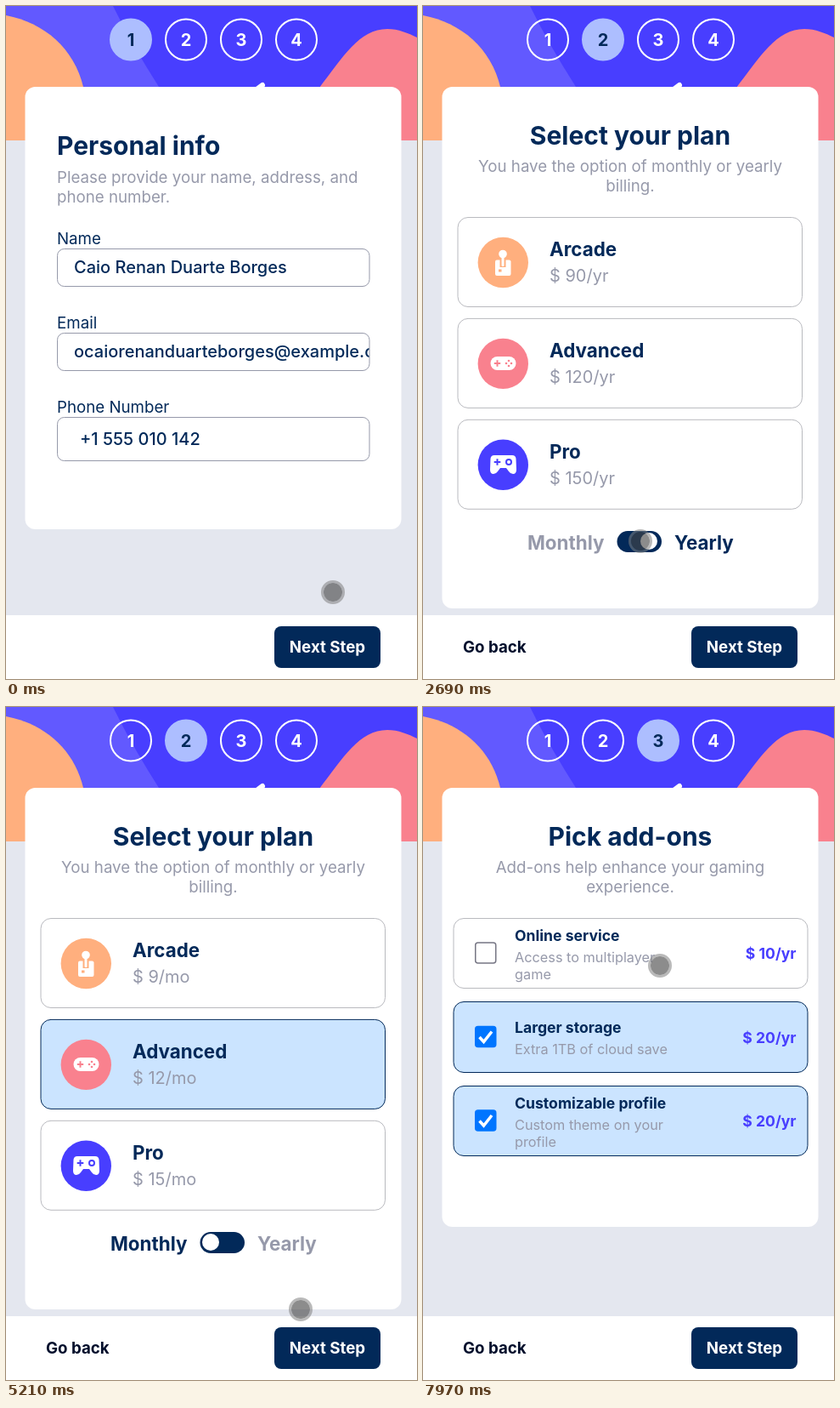
An HTML page for the animation above (8000 ms loop, 484 by 791 pixels).

```html
<!DOCTYPE html>
<html lang="en">
<head>
<meta charset="utf-8">
<title>Multi-step form</title>
<style>
  html, body { margin: 0; width: 100%; height: 100%; overflow: hidden; background: #e4e7ef; }
  svg { display: block; width: 100%; height: 100%; font-family: Inter, sans-serif; font-optical-sizing: none; }
  text { white-space: pre; }
</style>
</head>
<body>
<svg id="stage" viewBox="0 0 484 791" xmlns="http://www.w3.org/2000/svg"></svg>
<script>
const NAVY = '#022959', GRAY = '#9699aa', PURPLE = '#483eff', ORANGE = '#ffaf7e', PINK = '#f9818e';
const LOOP = 8000;

// ---- Drawing helpers ----
const text = (x, y, size, str, { fill = NAVY, weight = 400, anchor = 'start', id = '' } = {}) =>
  `<text x="${x}" y="${y}" font-size="${size}" fill="${fill}" font-weight="${weight}" text-anchor="${anchor}"${id && ` id="${id}"`}>${str}</text>`;

const box = (x, y, w, h, r, fill, extra = '') =>
  `<rect x="${x}" y="${y}" width="${w}" height="${h}" rx="${r}" fill="${fill}" ${extra}/>`;

const circle = (x, y, r, fill, extra = '') => `<circle cx="${x}" cy="${y}" r="${r}" fill="${fill}" ${extra}/>`;

const plus = (x, y, r, color) =>
  `<path d="M${x - r} ${y}h${2 * r}M${x} ${y - r}v${2 * r}" stroke="${color}" stroke-width="2"/>`;

const heading = (title, ...lines) =>
  text(244, 163, 30, title, { weight: 700, anchor: 'middle' }) +
  lines.map((line, i) => text(244, 195 + 23 * i, 18.72, line, { fill: GRAY, anchor: 'middle' })).join('');

const panel = bottom => box(22.5, 95, 443, bottom - 95, 12, '#fff');

// ---- Scenery ----
const scenery = `
  ${box(0, 0, 484, 791, 0, '#e4e7ef')}
  ${box(0, 0, 484, 158, 0, PURPLE)}
  <path d="M0 0H126Q148 45 180 95L205 158H0Z" fill="#6259ff"/>
  <path d="M0 11C46 20 80 50 91 95Q96 120 94 158H0Z" fill="${ORANGE}"/>
  <path d="M369 96C397 60 416 27 449 27C462 27 474 32 484 37V158H369Z" fill="${PINK}"/>
  <path d="M294 99L302 93" stroke="#fff" stroke-width="6" stroke-linecap="round"/>`;

const steps = [1, 2, 3, 4].map(n => {
  const x = 82 + 65 * n;
  return circle(x, 39.5, 24, 'none', `id="step${n}" stroke="#fff" stroke-width="2"`) +
    text(x, 47, 20, n, { weight: 700, anchor: 'middle', id: `num${n}` });
}).join('');

// ---- Page 1: personal info ----
const field = (label, value, y, height, x) =>
  text(60, y - 5, 18.72, label) +
  box(60.5, y + .5, 367.5, height, 8, '#fff', `stroke="${GRAY}"`) +
  `<g clip-path="url(#fieldClip)">${text(x, y + height / 2 + 7, 20, value, { weight: 500 })}</g>`;

const infoPage = panel(615) +
  text(60, 175, 30, 'Personal info', { weight: 700 }) +
  text(60, 208, 18.72, 'Please provide your name, address, and', { fill: GRAY }) +
  text(60, 231, 18.72, 'phone number.', { fill: GRAY }) +
  field('Name', 'Caio Renan Duarte Borges', 285, 44, 80) +
  field('Email', 'ocaiorenanduarteborges@example.com', 384, 44, 80) +
  field('Phone Number', '+1 555 010 142', 483, 51, 87);

// ---- Page 2: plans ----
const arcadeIcon = circle(94, 291.5, 4.8, '#fff') +
  box(85, 298.5, 18.5, 18.5, 2, '#fff') + box(90.5, 298, 7, 9, 0, ORANGE) +
  box(92.5, 294, 3, 12, 1, '#fff') + box(89, 309.5, 3.5, 3, 0, ORANGE);

const advancedIcon = box(79.5, 412, 30, 16, 8, '#fff') + plus(87.5, 420, 3.7, PINK) +
  [[98, 420], [104, 420], [101, 417], [101, 423]].map(([x, y]) => circle(x, y, 1.3, PINK)).join('');

const proIcon =
  `<path d="M84 528H105Q109 528 109.500 532L110 545Q110 550 106 550Q103 550 101 547L98 543H91L88 547Q86 550 83 550Q79 550 79 545L79.500 532Q80 528 84 528Z" fill="#fff"/>` +
  plus(87.5, 536, 3.8, PURPLE) + circle(101, 536, 3, 'none', `stroke="${PURPLE}" stroke-width="2"`);

const plans = [
  { name: 'Arcade', price: 9, color: ORANGE, icon: arcadeIcon },
  { name: 'Advanced', price: 12, color: PINK, icon: advancedIcon },
  { name: 'Pro', price: 15, color: PURPLE, icon: proIcon },
];

const planPage = panel(708) +
  heading('Select your plan', 'You have the option of monthly or yearly', 'billing.') +
  plans.map(({ name, color, icon }, i) => {
    const y = 248.5 + 118.9 * i;
    return box(41, y, 405.5, 105, 12, '#fff', `id="plan${i}"`) +
      circle(94.3, y + 53, 29.7, color) + icon +
      text(149, y + 45.5, 22.4, name, { weight: 700 }) +
      text(149, y + 75.5, 20, '', { fill: GRAY, id: `price${i}` });
  }).join('') +
  text(123, 639, 22.4, 'Monthly', { weight: 700, id: 'monthly' }) +
  text(296, 639, 22.4, 'Yearly', { weight: 700, id: 'yearly' }) +
  box(228.5, 617, 52.5, 25, 12.5, NAVY) + circle(241, 629, 10, '#fff', 'id="knob"');

// ---- Page 3: add-ons ----
const addons = [
  { name: 'Online service', note: ['Access to multiplayer', 'game'], price: 10, y: 248.5, h: 82 },
  { name: 'Larger storage', note: ['Extra 1TB of cloud save'], price: 20, y: 346.5, h: 83 },
  { name: 'Customizable profile', note: ['Custom theme on your', 'profile'], price: 20, y: 445.5, h: 82 },
];

const addonPage = panel(611) +
  heading('Pick add-ons', 'Add-ons help enhance your gaming', 'experience.') +
  addons.map(({ name, note, price, y, h }, i) => {
    const mid = y + h / 2;
    const top = mid - 5 - 10 * (note.length - 1);
    return box(36, y, 417, h, 12, '#fff', `id="addon${i}"`) +
      box(61.75, mid - 12.5, 24, 24, 3, '#fff', `id="check${i}" stroke-width="1.5"`) +
      `<path id="tick${i}" d="M66.500 ${mid}l5 5.500l9.500-12" fill="none" stroke="#fff" stroke-width="3.500"/>` +
      text(108, top, 17.6, name, { weight: 700 }) +
      note.map((line, n) => text(108, top + 25 + 20 * n, 16.3, line, { fill: GRAY })).join('') +
      text(439.5, mid + 6.5, 17.6, `$ ${price}/yr`, { fill: PURPLE, weight: 700, anchor: 'end' });
  }).join('');

const footer = box(0, 716, 484, 75, 0, '#fff') +
  text(47, 760, 18.72, 'Go back', { fill: '#020f2c', weight: 700, id: 'back' }) +
  box(316, 729, 125, 49, 8, NAVY, 'id="next"') +
  text(378.5, 760, 18.72, 'Next Step', { fill: '#fff', weight: 700, anchor: 'middle' });

const pointer = `<g id="pointer">
  ${circle(0, 0, 11, 'rgba(70,70,70,.62)')}
  ${circle(0, 0, 12.5, 'none', 'stroke="rgba(128,128,128,.55)" stroke-width="3"')}</g>`;

document.getElementById('stage').innerHTML = `
  <clipPath id="fieldClip"><rect x="61" y="285" width="366.500" height="250"/></clipPath>
  ${scenery}${steps}
  <g id="page1">${infoPage}</g><g id="page2">${planPage}</g><g id="page3">${addonPage}</g>
  ${footer}${pointer}`;

// ---- Timeline: [start ms, value] ----
const pageAt = [[0, 1], [700, 2], [6640, 3]];
const hoverAt = [[0, false], [700, true], [1790, false], [6640, true], [7180, false]];
const yearlyAt = [[0, 0], [1790, 1], [2800, 0], [5680, 1]];
const planAt = [[0, -1], [3520, 2], [3920, 1], [4200, 0], [4540, 1]];
const addonTaps = [Infinity, 7640, 7180];

// Pointer stops: [ms, x, y]
const route = [
  [130, 385, 689], [530, 372, 752], [950, 372, 752], [1380, 252, 613], [1530, 230, 626],
  [1660, 252, 630], [1760, 256, 629], [3020, 256, 629], [3440, 259, 545], [3580, 259, 545],
  [3850, 265, 417], [3950, 265, 410], [4170, 265, 305], [4300, 265, 305], [4500, 262, 412],
  [4640, 262, 412], [5140, 332, 677], [5210, 347, 708], [5260, 346, 712], [5600, 256, 630],
  [5980, 256, 630], [6500, 357, 754], [6800, 357, 754], [7120, 295, 490], [7260, 295, 490],
  [7550, 286, 380], [7700, 284, 378], [7970, 279, 304],
];

const stepAt = (list, t) => list.findLast(([start]) => start <= t);
const valueAt = (list, t) => stepAt(list, t)[1];
const smooth = p => { p = Math.min(1, Math.max(0, p)); return p * p * (3 - 2 * p); };

function pointerAt(t) {
  const i = route.findIndex(([end]) => end > t);
  if (i === 0) return route[0].slice(1);
  if (i < 0) return route.at(-1).slice(1);
  const [t0, x0, y0] = route[i - 1], [t1, x1, y1] = route[i];
  const p = smooth((t - t0) / (t1 - t0));
  return [x0 + (x1 - x0) * p, y0 + (y1 - y0) * p];
}

const el = id => document.getElementById(id);
const set = (id, attrs) => Object.entries(attrs).forEach(([k, v]) => el(id).setAttribute(k, v));
const show = (id, on) => set(id, { display: on ? 'inline' : 'none' });
const cardLook = on => on ? { fill: '#cbe4ff', stroke: NAVY } : { fill: '#fff', stroke: '#b9babf' };

function render(t) {
  const page = valueAt(pageAt, t);
  for (let n = 1; n <= 4; n++) {
    const active = n === page;
    set(`step${n}`, { fill: active ? '#adbeff' : 'none', stroke: active ? '#adbeff' : '#fff' });
    set(`num${n}`, { fill: active ? NAVY : '#fff' });
    if (n < 4) show(`page${n}`, active);
  }
  show('back', page > 1);
  set('next', { fill: valueAt(hoverAt, t) ? '#1c3f67' : NAVY });

  const [toggled, yearly] = stepAt(yearlyAt, t);
  const slide = toggled ? smooth((t - toggled) / 250) : 1;
  set('knob', { cx: 241 + 25 * (yearly ? slide : toggled ? 1 - slide : 0) });
  set('monthly', { fill: yearly ? GRAY : NAVY });
  set('yearly', { fill: yearly ? NAVY : GRAY });

  const chosen = valueAt(planAt, t);
  plans.forEach(({ price }, i) => {
    set(`plan${i}`, cardLook(i === chosen));
    el(`price${i}`).textContent = yearly ? `$ ${price * 10}/yr` : `$ ${price}/mo`;
  });

  addonTaps.forEach((tap, i) => {
    const on = t >= tap;
    set(`addon${i}`, cardLook(on));
    set(`check${i}`, on ? { fill: '#0075ff', stroke: '#0075ff' } : { fill: '#fff', stroke: '#767684' });
    show(`tick${i}`, on);
  });

  set('pointer', { transform: `translate(${pointerAt(t)})` });
}

const began = performance.now();
function tick() {
  render((performance.now() - began) % LOOP);
  requestAnimationFrame(tick);
}
tick();
</script>
</body>
</html>
```
